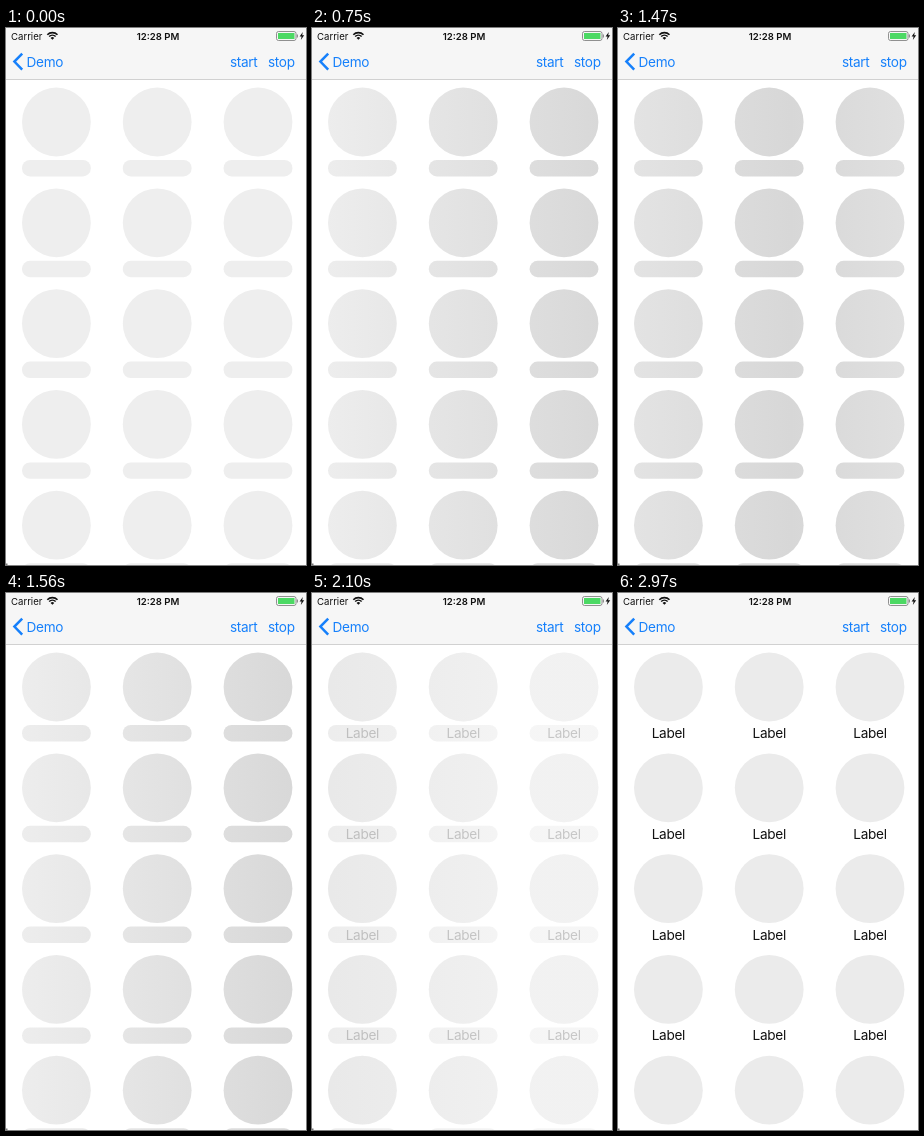
Animation of 300 by 537 pixels, one loop 3000 ms. Source, as an HTML page with a canvas:

```html
<!DOCTYPE html>
<html>
<head>
<meta charset="utf-8">
<style>
html, body { margin: 0; width: 100%; height: 100%; overflow: hidden; background: #fff; }
canvas { display: block; width: 300px; height: 537px; }
</style>
</head>
<body>
<canvas id="stage"></canvas>
<script>
const W = 300, H = 537, LOOP = 3000, STEP = 30;
const LIGHT = '#eeeeee', DARK = '#d7d7d7', BLUE = '#1680fb';
const FONT = 'Inter, Roboto, sans-serif';
// visible span of each shimmer sweep, and the time its curve is anchored to
const SWEEPS = [
  { from: 390, to: 810, anchor: 420 },
  { from: 1230, to: 1650, anchor: 1230 },
  { from: 2040, to: 2190, anchor: 2070 }
];
const FADE_FROM = 2028, FADE_TO = 2190;

const canvas = document.getElementById('stage');
const ctx = canvas.getContext('2d');
const ratio = window.devicePixelRatio || 1;
canvas.width = W * ratio;
canvas.height = H * ratio;
ctx.scale(ratio, ratio);

function text(str, x, y, size, color, { weight = 400, align = 'left', spacing = 0 } = {}) {
  ctx.font = `${weight} ${size}px ${FONT}`;
  ctx.letterSpacing = spacing + 'px';
  ctx.textAlign = align;
  ctx.fillStyle = color;
  ctx.fillText(str, x, y);
}

function line(points, width, color) {
  ctx.beginPath();
  points.forEach(([x, y]) => ctx.lineTo(x, y));
  ctx.lineWidth = width;
  ctx.strokeStyle = color;
  ctx.stroke();
}

function eachCell(draw) {
  for (let row = 0; row < 5; row++) {
    for (let col = 0; col < 3; col++) draw(50.4 + col * 100.8, 94 + row * 100.8);
  }
}

function circle(x, y) {
  ctx.beginPath();
  ctx.arc(x, y, 34.4, 0, Math.PI * 2);
  ctx.fill();
}

function drawWifi() {
  const x = 46.4, y = 11.8;
  ctx.strokeStyle = ctx.fillStyle = '#111';
  ctx.lineWidth = 1.6;
  for (const r of [4.6, 7.2]) {
    ctx.beginPath();
    ctx.arc(x, y, r, -Math.PI * 0.75, -Math.PI * 0.25);
    ctx.stroke();
  }
  ctx.beginPath();
  ctx.moveTo(x, y);
  ctx.arc(x, y, 2.6, -Math.PI * 0.75, -Math.PI * 0.25);
  ctx.fill();
}

function drawBattery() {
  ctx.beginPath();
  ctx.roundRect(270.5, 3.5, 19.5, 9, 2);
  ctx.lineWidth = 0.8;
  ctx.strokeStyle = '#777';
  ctx.stroke();
  ctx.fillStyle = '#4cd964';
  ctx.fillRect(272, 5, 16.5, 6);
  ctx.fillStyle = '#777';
  ctx.fillRect(290.8, 6.5, 1, 3);
  ctx.beginPath();
  [[296.8, 4], [293.6, 8.6], [295.6, 8.6], [294.8, 12], [298.2, 7.2], [296.2, 7.2]]
    .forEach(([x, y]) => ctx.lineTo(x, y));
  ctx.fillStyle = '#111';
  ctx.fill();
}

function drawBars() {
  ctx.fillStyle = '#f6f6f6';
  ctx.fillRect(0, 0, W, 51);
  ctx.fillStyle = '#c6c6c6';
  ctx.fillRect(0, 51, W, 0.8);

  text('Carrier', 5, 11.6, 9.6, '#111');
  drawWifi();
  text('12:28 PM', 152, 11.6, 9.6, '#111', { weight: 600, align: 'center' });
  drawBattery();

  line([[16.2, 25.6], [8.4, 33.6], [16.2, 41.6]], 2.5, BLUE);
  const tight = { spacing: -0.33 };
  text('Demo', 20.6, 38.6, 13.6, BLUE, tight);
  text('start', 224, 38.6, 13.6, BLUE, tight);
  text('stop', 262, 38.6, 13.6, BLUE, tight);
}

function drawContent() {
  eachCell((x, y) => {
    ctx.fillStyle = '#ebebeb';
    circle(x, y);
    text('Label', x, y + 51, 13.6, '#111', { align: 'center', spacing: -0.3 });
  });
}

function shimmer(t) {
  const sweep = SWEEPS.find(s => t >= s.from && t < s.to);
  if (!sweep) return LIGHT;
  const q = t - sweep.anchor;
  const peak = -110 + q + 0.00075 * q * q;
  const fill = ctx.createLinearGradient(peak - 300, 0, peak + 300, 0);
  fill.addColorStop(0, LIGHT);
  fill.addColorStop(0.5, DARK);
  fill.addColorStop(1, LIGHT);
  return fill;
}

function drawSkeleton(t, alpha) {
  // the placeholder hides the content fully until it fades
  ctx.globalAlpha = alpha;
  ctx.fillStyle = '#fff';
  ctx.fillRect(0, 52, W, H - 52);
  ctx.fillStyle = shimmer(t);
  eachCell((x, y) => {
    circle(x, y);
    ctx.beginPath();
    ctx.roundRect(x - 34.4, y + 38, 68.8, 16.4, 8);
    ctx.fill();
  });
  ctx.globalAlpha = 1;
}

function render(t) {
  ctx.fillStyle = '#fff';
  ctx.fillRect(0, 0, W, H);
  const fade = Math.min(1, Math.max(0, (t - FADE_FROM) / (FADE_TO - FADE_FROM)));
  if (fade > 0) drawContent();
  if (fade < 1) drawSkeleton(t, 1 - fade);
  drawBars();
  ctx.fillStyle = '#777';
  ctx.fillRect(0, H - 1.5, 1.5, 1.5);
}

const start = performance.now();
function tick() {
  const t = (performance.now() - start) % LOOP;
  render(Math.floor(t / STEP) * STEP);
  requestAnimationFrame(tick);
}
tick();
</script>
</body>
</html>
```
